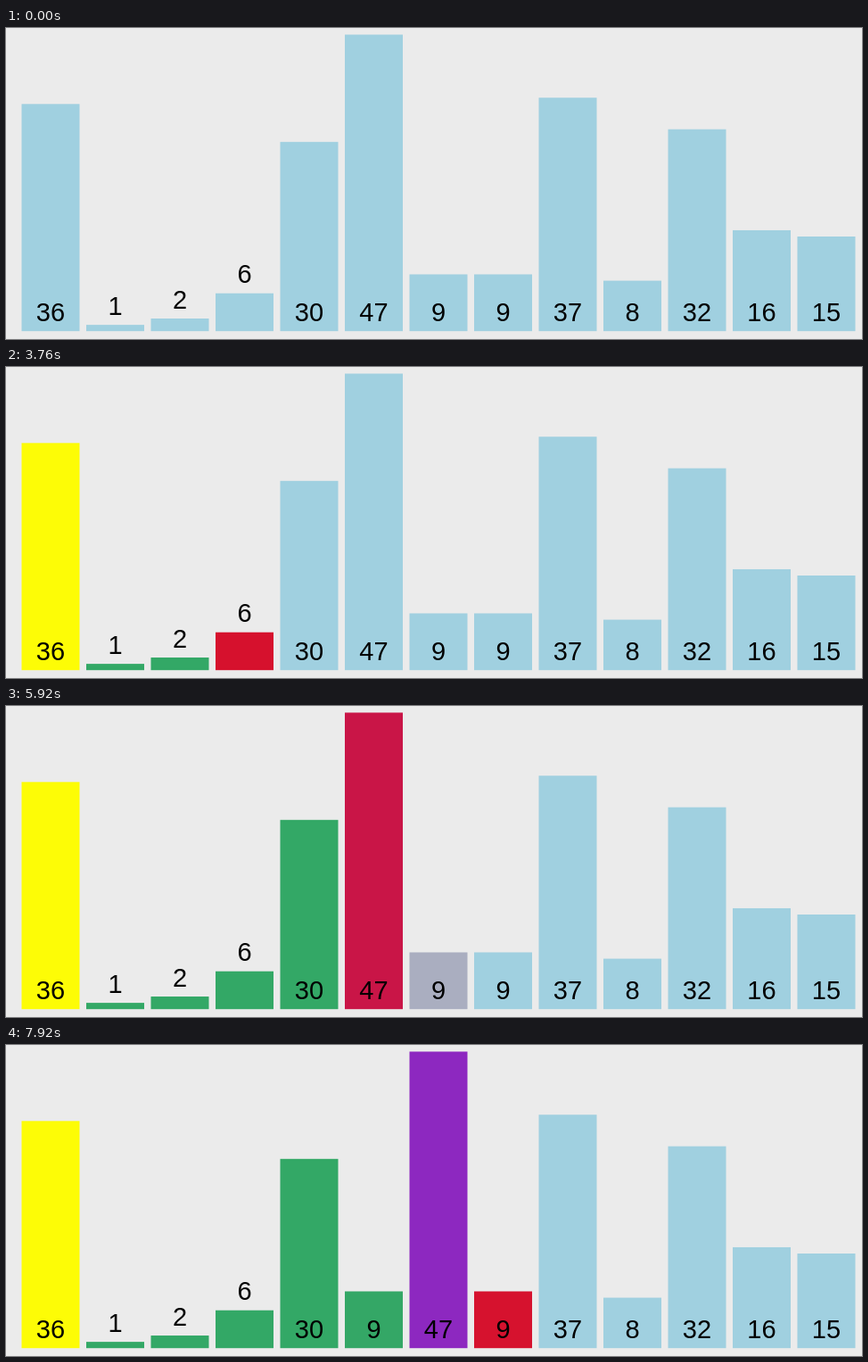
Recreate the animation shown at these times as an HTML page with a canvas. Size 960 by 349 pixels, loop 8000 ms.

```html
<!DOCTYPE html>
<html lang="en">
<head>
<meta charset="utf-8">
<title>Partition</title>
<style>
  html, body { margin: 0; width: 100%; height: 100%; overflow: hidden; background: #ebebeb; }
  canvas { display: block; }
</style>
</head>
<body>
<canvas id="stage" width="960" height="349"></canvas>
<script>
const ctx = document.getElementById('stage').getContext('2d');

const LOOP = 8000, TICK = 80;
const FIRST = 535, STEP = 868, FADE = 500;
const LEFT = 17.5, PITCH = 72.5, BAR = 65, BASE = 340.2, UNIT = 7.08;

const BLUE = [160, 208, 224], YELLOW = [253, 252, 6], RED = [214, 17, 45];
const GREEN = [51, 168, 102], PURPLE = [141, 40, 192];

const values = [36, 1, 2, 6, 30, 47, 9, 9, 37, 8, 32, 16, 15];
const SWAP_STEP = 7;

// Colour changes per bar: [step, colour]
const fades = { 0: [[0, YELLOW]], 5: [[5, RED], [6, PURPLE]], 6: [[6, RED], [8, GREEN]], 7: [[8, RED]] };
for (let i = 1; i <= 4; i++) fades[i] = [[i, RED], [i + 1, GREEN]];

// Slot shift during the swap
const shifts = { 5: 1, 6: -1 };

const ease = u => u < 0.5 ? 4 * u ** 3 : 1 - 4 * (1 - u) ** 3;

function progress(t, step) {
  const u = (t - FIRST - step * STEP) / FADE;
  return ease(Math.min(1, Math.max(0, u)));
}

function colorAt(i, t) {
  let color = BLUE;
  for (const [step, next] of fades[i] || []) {
    const k = progress(t, step);
    color = color.map((c, n) => c + (next[n] - c) * k);
  }
  return `rgb(${color.map(Math.round).join(',')})`;
}

function draw(t) {
  ctx.fillStyle = '#ebebeb';
  ctx.fillRect(0, 0, 960, 349);

  const bars = values.map((value, i) => ({
    value,
    x: LEFT + PITCH * (i + (shifts[i] || 0) * progress(t, SWAP_STEP)),
    h: value * UNIT,
    color: colorAt(i, t)
  }));

  for (const { x, h, color } of bars) {
    ctx.fillStyle = color;
    ctx.fillRect(x, BASE - h, BAR, h);
  }

  ctx.fillStyle = '#000';
  ctx.font = '29px "Liberation Sans", Arial, sans-serif';
  ctx.textAlign = 'center';
  ctx.textBaseline = 'alphabetic';
  for (const { value, x, h } of bars) {
    const y = value < 7 ? BASE - h - 11.5 : 329;
    ctx.fillText(value, x + BAR / 2, y);
  }
}

function frame() {
  const t = performance.now() % LOOP;
  draw(Math.floor(t / TICK) * TICK);
  requestAnimationFrame(frame);
}
frame();
</script>
</body>
</html>
```
